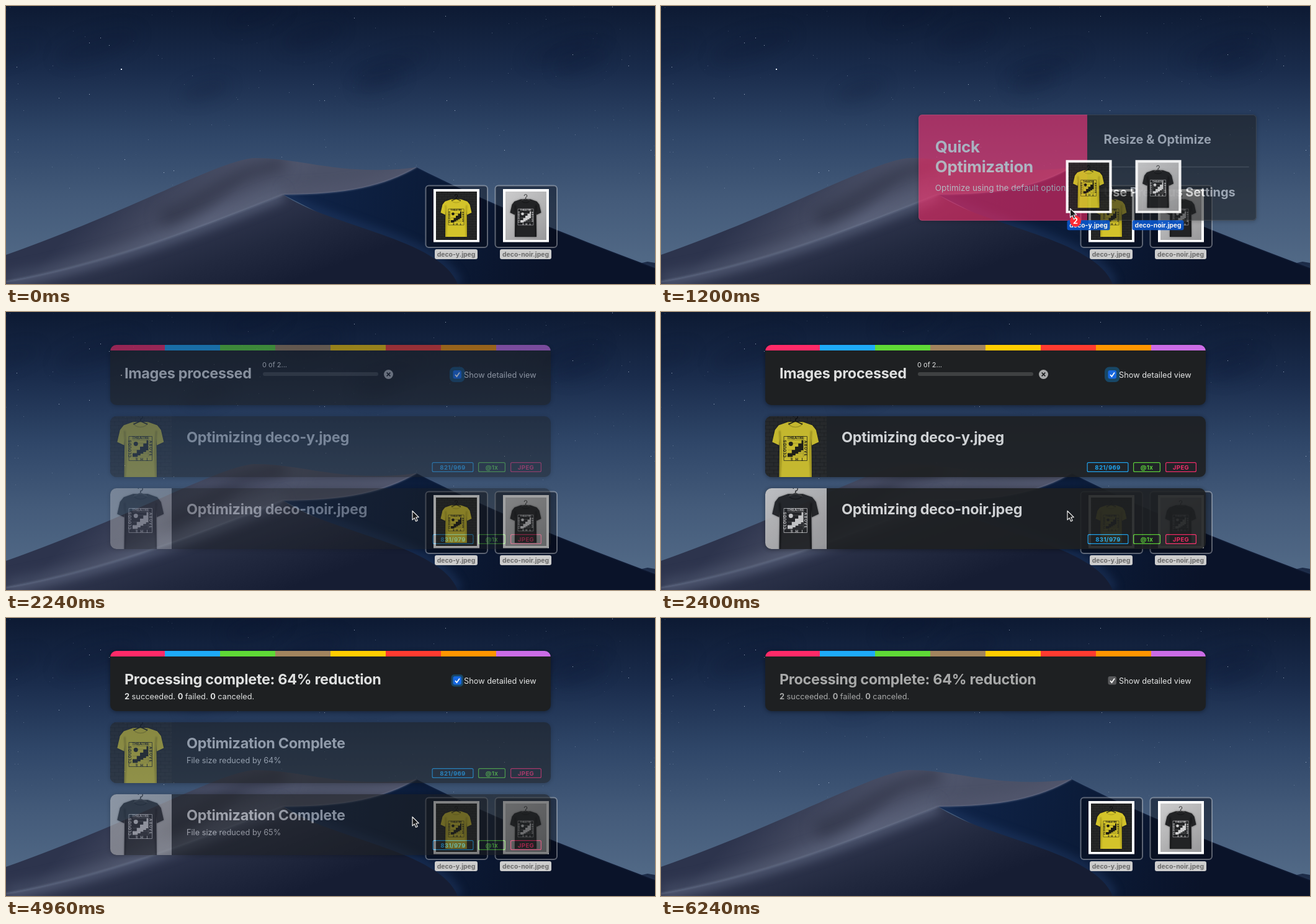
An HTML page with a canvas that plays this animation: 1046x448 px, repeating every 6.32 s.

```html
<!DOCTYPE html>
<html lang="en">
<head>
<meta charset="utf-8">
<title>Drag to optimize</title>
<style>
html, body { margin: 0; width: 100%; height: 100%; overflow: hidden; background: #14233f; }
canvas { display: block; width: 1046px; height: 448px; }
</style>
</head>
<body>
<canvas id="stage" width="1046" height="448"></canvas>
<script>
const W = 1046, H = 448, LOOP = 6320, STEP = 80;
const PINK = '#ff2a68', BLUE = '#1eaaf8', GREEN = '#5fd936', DARK = '#1e2022', INK = '#dfe0e0';
const STRIPES = [PINK, BLUE, GREEN, '#a2845e', '#ffcc00', '#ff3b30', '#ff9500', '#cb6ce6'];
const GRAB = { x: 696, y: 373 }, DROP = { x: 655, y: 320.5 };
const GRABBED = 880, DROPPED = 1840, FINISHED = 2880, BLURRED = 5360;
const FILES = [
  { name: 'deco-y.jpeg', x: 689, labelWidth: 69, size: '821/969', saved: 64, black: false },
  { name: 'deco-noir.jpeg', x: 801, labelWidth: 83, size: '831/979', saved: 65, black: true }
];

function newLayer() {
  const el = document.createElement('canvas');
  el.width = W;
  el.height = H;
  return el.getContext('2d');
}
const stage = document.getElementById('stage').getContext('2d');
const scratch = newLayer(), backdrop = newLayer();
let c = stage;

// Draws a group as one picture, then blends it in.
function group(alpha, draw) {
  if (alpha <= 0) return;
  scratch.clearRect(0, 0, W, H);
  c = scratch;
  draw();
  c = stage;
  c.globalAlpha = alpha;
  c.drawImage(scratch.canvas, 0, 0);
  c.globalAlpha = 1;
}

const mix = (a, b, p) => a + (b - a) * p;
const progress = (t, from, to) => Math.min(1, Math.max(0, (t - from) / (to - from)));
const easeOut = (t, from, to, power = 2) => 1 - (1 - progress(t, from, to)) ** power;

let seed = 11;
const random = () => (seed = (seed * 16807) % 2147483647) / 2147483647;

function text(s, x, y, size, weight = 400, color = INK, spacing = 0) {
  c.font = `${weight} ${size}px Inter, sans-serif`;
  c.letterSpacing = spacing + 'px';
  c.fillStyle = color;
  c.fillText(s, x, y);
  return x + c.measureText(s).width;
}
const title = (s, x, y, color) => text(s, x, y, 23.4, 700, color, -.3);
function centered(...args) {
  c.textAlign = 'center';
  text(...args);
  c.textAlign = 'left';
}

function fill(color) {
  c.fillStyle = color;
  c.fill();
}
function stroke(color, width = 1) {
  c.strokeStyle = color;
  c.lineWidth = width;
  c.stroke();
}
function box(x, y, w, h, r, color, line, width) {
  c.beginPath();
  c.roundRect(x, y, w, h, r);
  if (color) fill(color);
  if (line) stroke(line, width);
}
function circle(x, y, r, color) {
  c.beginPath();
  c.arc(x, y, r, 0, 7);
  fill(color);
}
function lines(...points) {
  c.beginPath();
  points.forEach(p => c.lineTo(...p));
}
function shadowBox(...args) {
  c.save();
  c.shadowColor = 'rgba(0,0,0,.4)';
  c.shadowBlur = 7;
  c.shadowOffsetY = 1;
  box(...args);
  c.restore();
}
function clipped(x, y, w, h, r, draw) {
  c.save();
  c.beginPath();
  c.roundRect(x, y, w, h, r);
  c.clip();
  draw();
  c.restore();
}
function gradient(x0, y0, x1, y1, ...colors) {
  const g = c.createLinearGradient(x0, y0, x1, y1);
  colors.forEach((color, i) => g.addColorStop(i / (colors.length - 1), color));
  return g;
}

function paintSky() {
  c.fillStyle = gradient(0, 0, 0, 420, '#0d1a33', '#1a2c4c', '#2f4668', '#445b7a', '#526a87');
  c.fillRect(0, 0, W, H);
  c.save();
  c.filter = 'blur(12px)';
  for (let i = 0; i < 9; i++) {
    c.beginPath();
    c.ellipse(random() * W, random() * 170, 40 + random() * 50, 12 + random() * 10, -.3, 0, 7);
    fill('rgba(9,20,44,.18)');
  }
  c.restore();
  for (let i = 0; i < 190; i++) {
    const bright = i % 9 ? .3 * random() ** 2 + .06 : .7;
    c.fillStyle = `rgba(215,228,245,${bright})`;
    c.fillRect(random() * W | 0, random() * 300 | 0, 1, 1);
  }
  c.fillStyle = '#e8f0fa';
  c.fillRect(185, 101, 2, 2);
}

// Each curve is a cubic Bezier: start, two handles, end.
const PEAK = [400, 245], TIP = [662, 260], FOOT = [447, 304];
const rise = [[0, 401], [200, 331], [345, 248], PEAK];
const crest = [PEAK, [480, 245], [540, 275], TIP];
const slope = [TIP, [760, 310], [900, 368], [1046, 422]];
const ridge = [TIP, [610, 290], [550, 304], FOOT];
const front = [FOOT, [330, 350], [180, 412], [0, 444]];
const fold = [FOOT, [520, 355], [700, 375], [728, 448]];
const back = curve => [...curve].reverse();

function trace(...curves) {
  c.beginPath();
  curves.forEach(([a, b, d, e]) => {
    c.lineTo(...a);
    c.bezierCurveTo(...b, ...d, ...e);
  });
}
function glow(curve, color, width, blur) {
  c.save();
  c.filter = `blur(${blur}px)`;
  trace(curve);
  stroke(color, width);
  c.restore();
}
function face(color, curves, corners, shade) {
  trace(...curves);
  corners.forEach(p => c.lineTo(...p));
  c.closePath();
  fill(color);
  c.save();
  c.clip();
  shade();
  c.restore();
}

function paintDunes() {
  lines([1020, 415], [1034, 412], [1046, 414], [1046, 430]);
  fill('#1c2b47');
  face(gradient(180, 290, 330, 440, '#2d344d', '#40465d', '#525870', '#4b5167'), [rise, crest, ridge, front], [], () => {
    glow([[250, 345], [320, 320], [370, 265], [450, 252]], 'rgba(36,39,56,.55)', 26, 12);
    glow(ridge, 'rgba(92,96,118,.35)', 26, 9);
    glow(front, 'rgba(125,134,158,.25)', 26, 10);
  });
  face(gradient(480, 300, 880, 410, '#0f2347', '#0b1b38', '#0a1329'), [back(ridge), slope], [[W, H], [728, H], FOOT], () => {
    glow(fold, 'rgba(36,62,106,.5)', 16, 7);
  });
  face(gradient(400, 310, 450, 448, '#31374f', '#22293f', '#161d33'), [back(front), fold], [[0, H]], () => {
    glow(front, 'rgba(125,136,164,.5)', 16, 9);
  });
  glow(front, 'rgba(155,166,190,.35)', 2, 1.5);
  glow(ridge, 'rgba(140,152,182,.4)', 1.6, .8);
  glow(slope, 'rgba(75,98,138,.3)', 1.2, .8);
}

function printSide(s, angle, spacing) {
  c.save();
  c.translate(32.5, 41);
  c.rotate(angle);
  centered(s, 0, -9.7, 4, 700, c.fillStyle, spacing);
  c.restore();
}

function paintPrint(ink, cloth) {
  box(24, 32, 17, 18, 0, ink);
  c.fillStyle = cloth;
  for (let i = 0; i < 4; i++) {
    c.fillRect(24, 32 + i * 3.5, 15 - i * 3.5, 3.5);
    c.fillRect(38.5 - i * 3, 43 + i * 1.8, 2.5 + i * 3, 1.8);
  }
  circle(27.5, 36, 2.3, ink);
  box(20, 28, 25, 26, 0, null, ink, .5);
  c.fillStyle = ink;
  printSide('THEATRE', 0, 0);
  printSide('ABOVE', Math.PI / 2, .7);
  printSide('THE', Math.PI, 3);
  printSide('CLOUDS', -Math.PI / 2, .4);
}

function shirtOutline() {
  const half = [[8, 12.5], [18, 16], [22, 21], [25, 34], [17.5, 37.5], [17, 30], [17.5, 73]];
  lines(...half.map(([x, y]) => [32.5 + x, y]), ...half.reverse().map(([x, y]) => [32.5 - x, y]));
  c.closePath();
}

// Shirt picture in a 66 by 78 space.
function photo(x, y, scale, black) {
  const cloth = black ? '#222325' : '#d3c32a';
  c.save();
  c.translate(x, y);
  c.scale(scale, scale);
  c.beginPath();
  c.rect(0, 0, 66, 78);
  c.clip();
  fill(black ? gradient(0, 0, 66, 78, '#cbcbcc', '#b4b4b5', '#98989a') : '#262727');
  if (!black) {
    c.fillStyle = 'rgba(0,0,0,.3)';
    for (let row = 0; row < 20; row++) {
      c.fillRect(0, row * 4, 66, .5);
      for (let col = 0; col < 8; col++) c.fillRect(col * 9 + row % 2 * 4.5, row * 4, .5, 4);
    }
  }
  c.save();
  c.shadowColor = 'rgba(0,0,0,.5)';
  c.shadowBlur = 3;
  shirtOutline();
  c.lineJoin = 'round';
  fill(cloth);
  c.restore();
  shirtOutline();
  c.save();
  c.clip();
  c.filter = 'blur(1px)';
  for (const side of [-1, 1]) {
    lines([32.5 + side * 17, 22], [32.5 + side * 15.5, 45], [32.5 + side * 17, 74]);
    stroke(black ? 'rgba(0,0,0,.5)' : 'rgba(90,78,0,.45)', 1.6);
  }
  c.restore();
  c.beginPath();
  c.ellipse(32.5, 13, 7.5, 5, 0, 0, Math.PI);
  stroke(black ? '#141516' : '#a89a1c', 1);
  c.beginPath();
  c.arc(32.5, 7, 2.3, Math.PI, Math.PI * 2.5);
  c.lineTo(32.5, 11.5);
  stroke(black ? '#333' : '#0c0c0c', 1);
  lines([25, 15], [32.5, 11.5], [40, 15]);
  stroke(black ? '#3a3a3a' : '#15150c', 1);
  paintPrint(black ? '#cfcfd0' : '#1d1c12', cloth);
  c.restore();
}

function icon(file, held) {
  const middle = file.x + 36.5, w = file.labelWidth;
  if (!held) box(file.x - 12.5, 289.5, 99.5, 99.5, 5, 'rgba(5,10,22,.45)', 'rgba(255,255,255,.34)', 2);
  box(file.x, 295, 74, 85.5, 0, '#fff');
  photo(file.x + 4, 299, 1, file.black);
  box(middle - w / 2, 392, w, 16, 3, held ? '#0a55c8' : '#cdcdcd');
  centered(file.name, middle, 404, 10.4, 700, held ? '#fff' : '#6b6b6b');
}

function panel(scale) {
  c.save();
  c.translate(687.3, 347 - (scale - 1) * 10);
  c.scale(scale, scale);
  c.translate(-687.3, -347);
  shadowBox(442, 193, 491, 154, 5, DARK);
  box(442, 193, 245, 154, [5, 0, 0, 5], PINK);
  box(442.5, 193.5, 490, 153, 5, null, 'rgba(255,255,255,.17)');
  title('Quick', 466, 248, '#fff');
  title('Optimization', 466, 277, '#fff');
  text('Optimize using the default options', 466, 304, 12.15, 400, '#fff');
  text('Resize & Optimize', 711, 235, 18, 700, INK, -.07);
  c.fillStyle = 'rgba(255,255,255,.24)';
  c.fillRect(698, 268.5, 224, 1);
  text('Use Previous Settings', 711, 312, 18, 700, INK, -.07);
  c.restore();
}

function checkbox(t, active) {
  if (active) {
    const ring = t < 2480 ? 5.5 : 3;
    box(720.5 - ring, 94 - ring, 13.5 + ring * 2, 13.5 + ring * 2, 2 + ring, '#184766');
  }
  box(720.5, 94, 13.5, 13.5, 3, active ? '#1768e0' : '#58595b');
  lines([724, 101], [726.5, 104], [731, 97.5]);
  stroke('#fff', 1.7);
}

function progressBar() {
  text('0 of 2...', 413, 89, 11);
  box(414, 97, 186, 6, 3, '#3f4142');
  circle(616.5, 100.5, 7.5, '#a9aaab');
  for (const d of [-2.8, 2.8]) {
    lines([616.5 - d, 97.7], [616.5 + d, 103.3]);
    stroke(DARK, 1.7);
  }
}

function header(t) {
  const active = t < BLURRED, ink = active ? INK : '#a8a9a9';
  shadowBox(168, 53, 710, 97, 10, DARK);
  clipped(168, 53, 710, 97, 10, () => STRIPES.forEach((color, i) => {
    c.fillStyle = color;
    c.fillRect(Math.round(167.5 + i * 88.9), 53, 90, 9);
  }));
  if (t < FINISHED) {
    title('Images processed', 191, 107);
    progressBar();
  } else {
    title('Processing complete: 64% reduction', 191, 107, ink);
    let x = 191;
    ['2', ' succeeded. ', '0', ' failed. ', '0', ' canceled.'].forEach((part, i) => {
      x = text(part, x, 131, 12.75, i % 2 ? 400 : 700, ink);
    });
  }
  checkbox(t, active);
  text('Show detailed view', 738, 106, 12.75, 400, '#e4e5e5');
}

function tag(x, y, w, s, color) {
  box(x + .6, y + .6, w - 1.2, 14.8, 2, null, color, 1.2);
  centered(s, x + w / 2, y + 11.8, 9.6, 700, color, .35);
}

function card(file, i, t) {
  const y = 168 + i * 116;
  shadowBox(168, y, 710, 98, 10, DARK);
  clipped(168, y, 99, 98, [10, 0, 0, 10], () => photo(168, y - 9.5, 1.5, file.black));
  if (t < FINISHED) {
    title('Optimizing ' + file.name, 291, y + 42);
  } else {
    title('Optimization Complete', 291, y + 42);
    text(`File size reduced by ${file.saved}%`, 291, y + 66, 12.75);
  }
  tag(686.5 + i, y + 74, 67 - i, file.size, BLUE);
  tag(761, y + 74, 44, '@1x', GREEN);
  tag(813, y + 74, 50, 'JPEG', PINK);
}

function pointer(x, y) {
  c.save();
  c.translate(x, y);
  lines([0, 0], [0, 14.5], [3.3, 11.4], [5.6, 16.8], [8.2, 15.6], [5.9, 10.4], [10.3, 10.2]);
  c.closePath();
  c.lineJoin = 'round';
  fill('#17181a');
  stroke('#e6e6e6', 1.2);
  c.restore();
}

function badge(x, y) {
  circle(x, y, 9, '#fb2c36');
  centered('2', x, y + 4.5, 12.5, 700, '#fff');
}

function cursorAt(t) {
  const enter = easeOut(t, 80, 400), drag = easeOut(t, 800, 1400);
  const leave = progress(t, 5280, 5600) ** 2;
  return {
    x: mix(mix(702, GRAB.x, enter), DROP.x, drag) + leave * 6,
    y: mix(mix(470, GRAB.y, enter), DROP.y, drag) + leave * 150
  };
}

function render(t) {
  c.drawImage(backdrop.canvas, 0, 0);
  const { x, y } = cursorAt(t);
  const dragging = t >= GRABBED && t < DROPPED;
  if (dragging) {
    const open = easeOut(t, 1120, 1440, 3);
    group(open, () => panel(mix(1.26, 1, open)));
    group(.93, () => {
      c.save();
      c.translate(x - GRAB.x, y - GRAB.y);
      FILES.forEach(file => icon(file, true));
      c.restore();
    });
  }
  group(easeOut(t, 2160, 2400), () => header(t));
  group(easeOut(t, 2160, 2500) - easeOut(t, 4880, 5200), () => FILES.forEach((file, i) => card(file, i, t)));
  if (dragging) badge(x + 8.5, y + 20.5);
  if (t >= 160 && t < 5600) pointer(x, y);
}

c = backdrop;
paintSky();
paintDunes();
FILES.forEach(file => icon(file, false));
c = stage;

const start = performance.now();
let shown = -1;
function tick() {
  const t = Math.floor((performance.now() - start) % LOOP / STEP) * STEP;
  if (t !== shown) render(shown = t);
  requestAnimationFrame(tick);
}
tick();
</script>
</body>
</html>
```
